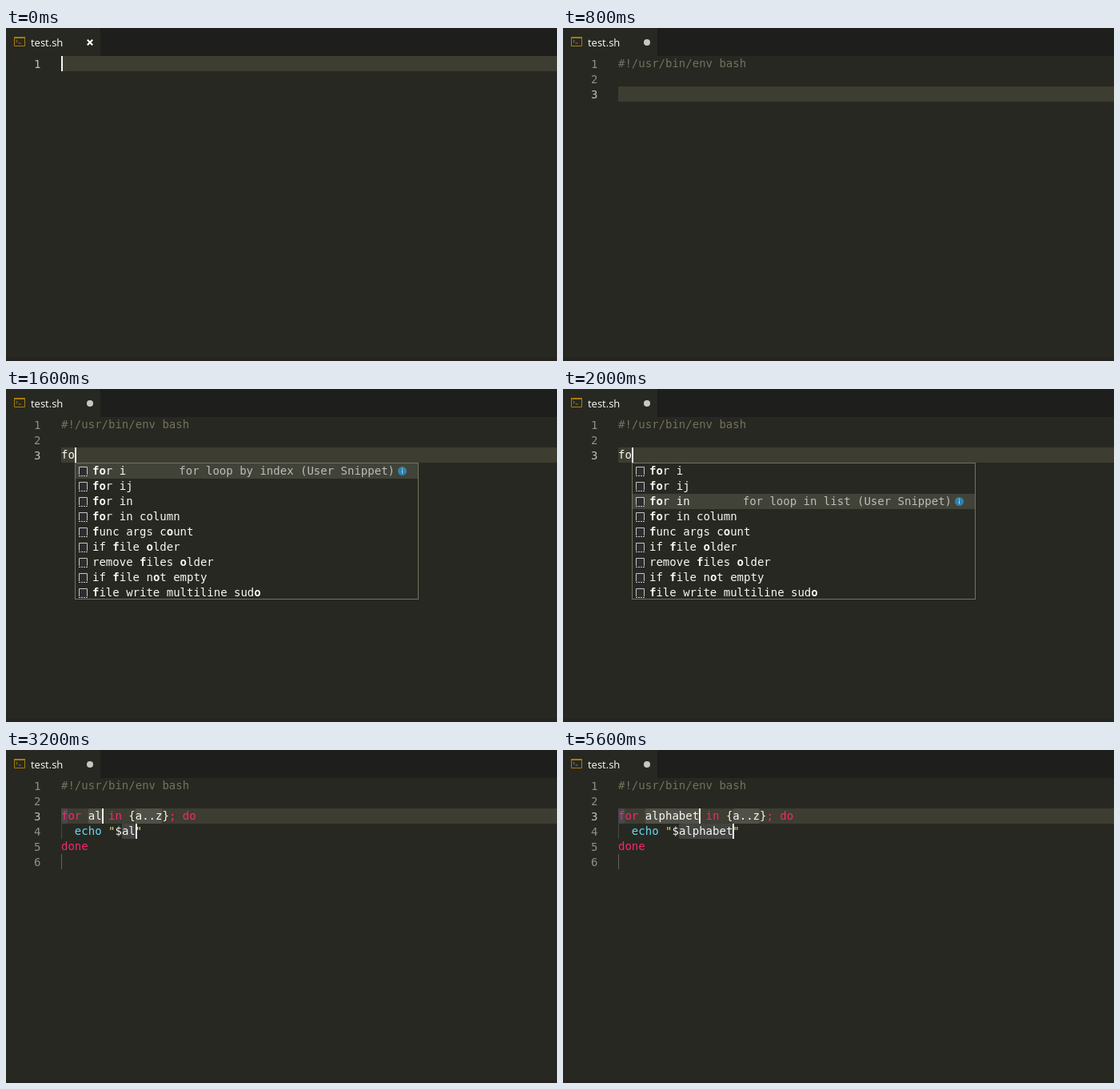
These frames come from a looping animation (689 by 416 pixels, 6 s). An HTML page:

```html
<!DOCTYPE html>
<html lang="en">
<head>
<meta charset="utf-8">
<title>Shell snippet demo</title>
<style>
  html, body { margin: 0; width: 100%; height: 100%; overflow: hidden; background: #272822; }
  svg { display: block; width: 689px; height: 416px; }
  text { font: 14px "DejaVu Sans Mono", monospace; white-space: pre; fill: #f8f8f2; }
  .b { font-weight: bold; }
  .tab { font: 13px "Open Sans", "Noto Sans", sans-serif; fill: #fff; }
  .comment { fill: #75715e; }
  .key { fill: #f92672; }
  .cmd { fill: #66d9ef; }
  .str { fill: #e6db74; }
  .num { fill: #90908a; text-anchor: end; }
  .active { fill: #c2c2bf; }
  .detail { fill: #bcbdb7; text-anchor: end; }
</style>
</head>
<body>
<svg viewBox="0 0 689 416">
  <rect width="689" height="416" fill="#272822"/>
  <rect x="118" width="571" height="35" fill="#1e1f1c"/>
  <rect y="412" width="689" height="4" fill="#242320"/>
  <g fill="none" stroke="#a87c0c">
    <path d="M10.5 12.5H23.5V22.5H10.5Z"/>
    <path d="M10 12H24" stroke-width="2"/>
    <path d="M12.5 15L14.5 16.5L12.5 18.2M15.5 19H18.5"/>
  </g>
  <text class="tab" x="31" y="23">test.sh</text>
  <path id="close" d="M101.8 14.8L108.2 21.2M108.2 14.8L101.8 21.2" stroke="#fff" stroke-width="2.1"/>
  <circle id="dirty" cx="105" cy="18" r="4" fill="#c8c8c3"/>
  <g id="editor"></g>
</svg>
<script>
const LEFT = 69, TOP = 35, ROW = 19, CHAR = 8.428;
const STEP = 400, LOOP = 6000;
const WORD = "alphabet";

const colX = col => LEFT + col * CHAR;
const lineY = line => TOP + (line - 1) * ROW;
const rect = (x, y, w, h, fill, extra = "") =>
  `<rect x="${x}" y="${y}" width="${w}" height="${h}" fill="${fill}" ${extra}/>`;
const text = (x, y, str, cls = "") => `<text x="${x}" y="${y}" class="${cls}">${str}</text>`;

const lineMark = line => rect(LEFT, lineY(line), 620, ROW, "#3e3d32");
const cursor = (line, col) => rect(Math.round(colX(col)), lineY(line), 2, ROW, "#f8f8f0");
const mark = (line, col, len, fill) =>
  rect(colX(col), lineY(line), len * CHAR, ROW, fill, 'rx="2"');
const guide = (line, fill) => rect(LEFT, lineY(line), 1, ROW, fill);

// A line is a list of [class, string] parts laid end to end.
function code(line, parts) {
  const spans = parts.map(([cls, str]) => `<tspan class="${cls}">${str}</tspan>`).join("");
  return text(LEFT, lineY(line) + 14, spans);
}

function numbers(count, active) {
  let out = "";
  for (let n = 1; n <= count; n++)
    out += text(43.4, lineY(n) + 15, n, n === active ? "num active" : "num");
  return out;
}

const shebang = () => code(1, [["comment", "#!/usr/bin/env bash"]]);

// Matched letters in a label stand between asterisks.
const label = str => str.split("*")
  .map((s, i) => i % 2 ? `<tspan class="b">${s}</tspan>` : s).join("");

function popup(line, col, rows, picked, detail) {
  const x = Math.round(colX(col)), y = lineY(line + 1), h = rows.length * ROW;
  let out = rect(x, y, 430, h, "#272822");
  rows.forEach((row, i) => {
    const ry = y + 1 + i * ROW;
    if (i === picked) {
      out += rect(x + 1, ry, 428, Math.min(ROW, h - 2), "#414339");
      out += text(x + 400, ry + 14, detail + " (User Snippet)", "detail");
      out += `<circle cx="${x + 409.5}" cy="${ry + 9.5}" r="5.5" fill="#3182ad"/>`;
      out += rect(x + 409, ry + 6, 1, 1.5, "#b8dcec") + rect(x + 409, ry + 8.5, 1, 4, "#b8dcec");
    }
    out += rect(x + 5, ry + 4, 11, 11, "#2d2d30");
    out += `<path d="M${x + 5.5} ${ry + 14}v-9.5h10v9.5" fill="none" stroke="#c5c5c5"/>`;
    out += `<path d="M${x + 5} ${ry + 15.5}h11" stroke="#c5c5c5" stroke-dasharray="2 1"/>`;
    out += text(x + 22, ry + 14, label(row));
  });
  return out + rect(x + 0.5, y + 0.5, 429, h - 1, "none", 'stroke="#75715e"');
}

const rowsF = ["*f*or i", "*f*or ij", "*f*or in", "*f*or in column", "*f*unc args count",
  "*f*ile write multiline sudo", "i*f* file empty", "i*f* file exists", "i*f* file not empty",
  "i*f* file older", "i*f* not exists", "remove *f*iles older"];
const rowsFo = ["*fo*r i", "*fo*r ij", "*fo*r in", "*fo*r in column", "*f*unc args c*o*unt",
  "if *f*ile *o*lder", "remove *f*iles *o*lder", "if *f*ile n*o*t empty",
  "*f*ile write multiline sud*o*"];

function typing(line, str, rows, picked, detail) {
  return lineMark(line) + (line > 1 ? shebang() : "") + numbers(line, line) +
    code(line, [["", str]]) + cursor(line, str.length) +
    popup(line, str.length, rows, picked, detail);
}

function loopCode(word, selected) {
  const n = word.length, range = 4 + n + 5;
  let out = selected ? "" : lineMark(3) + mark(3, 0, 1, "#48474a");
  out += mark(3, 4, n, selected ? "#616460" : "#515048");
  out += mark(3, range, 4, selected ? "#41423d" : "#515048");
  out += mark(4, 9, n, selected ? "#616460" : "#424442");
  out += guide(4, "#464741") + guide(6, "#62635d");
  out += numbers(6, 3) + shebang();
  out += code(3, [["key", "for"], ["", ` ${word} `], ["key", "in"], ["", " {a..z}"], ["key", "; do"]]);
  out += code(4, [["cmd", "  echo "], ["str", '"'], ["", "$" + word], ["str", '"']]);
  out += code(5, [["key", "done"]]);
  return selected ? out : out + cursor(3, 4 + n) + cursor(4, 9 + n);
}

const opening = [
  () => lineMark(1) + numbers(1, 1) + cursor(1, 0),
  () => typing(1, "b", ["*b*ash"], 0, "bash shebang"),
  () => lineMark(3) + numbers(3, 3) + shebang(),
  () => typing(3, "f", rowsF, 0, "for loop by index"),
  () => typing(3, "fo", rowsFo, 0, "for loop by index"),
  () => typing(3, "fo", rowsFo, 2, "for loop in list"),
  () => loopCode("item", true)
];

const byId = id => document.getElementById(id);
let shown = -1;

function draw(time) {
  const step = Math.floor((time % LOOP) / STEP);
  if (step !== shown) {
    shown = step;
    const typed = step - opening.length + 1;
    byId("editor").innerHTML = typed > 0 ? loopCode(WORD.slice(0, typed), false) : opening[step]();
    byId("close").style.display = step ? "none" : "";
    byId("dirty").style.display = step ? "" : "none";
  }
}

const start = performance.now();
function tick() {
  draw(performance.now() - start);
  requestAnimationFrame(tick);
}
tick();
</script>
</body>
</html>
```
